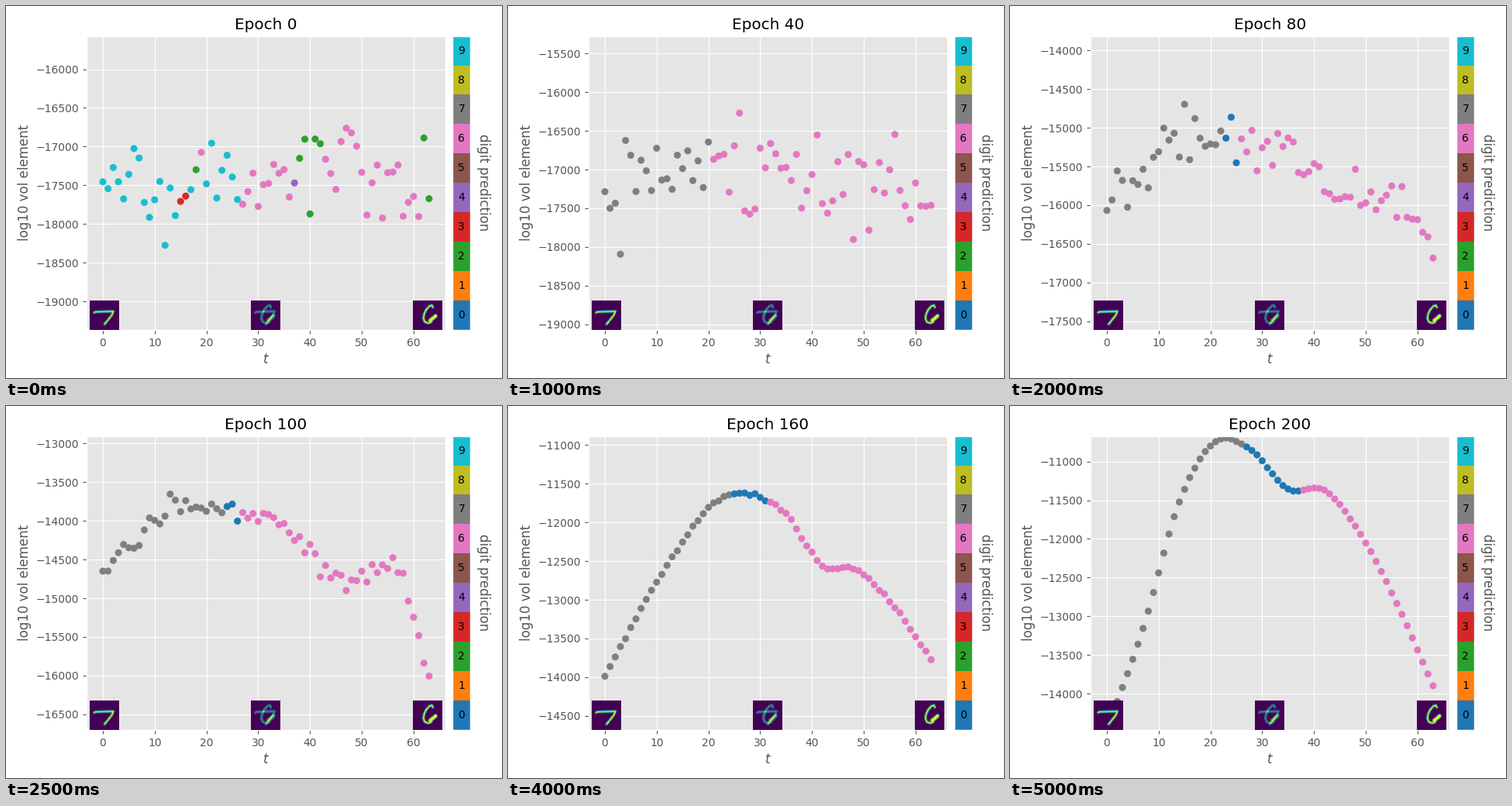
A matplotlib script for the animation above (5.5 s loop, 640 by 480 pixels).

```python
import matplotlib.pyplot as plt
import numpy as np
from matplotlib.animation import FuncAnimation
from matplotlib.ticker import MultipleLocator

W, H = 640, 480
STEPS = 64
SPAN = 3800
GREY = "#555555"
TOP, BOTTOM = 38.6, 418

plt.rcParams.update({
    "font.family": "DejaVu Sans", "font.size": 10,
    "axes.facecolor": "#E5E5E5", "axes.edgecolor": "white",
    "axes.linewidth": 1, "axes.grid": True, "axes.axisbelow": True,
    "axes.titlesize": 14.4, "axes.labelsize": 12, "axes.labelcolor": GREY,
    "grid.color": "white", "grid.linestyle": "-", "grid.linewidth": 0.8,
    "xtick.color": GREY, "ytick.color": GREY, "patch.linewidth": 0.5,
})

# Upper axis limit for every 20 epochs
LIMITS = [-15570, -15800, -15273, -14695, -13813, -12902,
          -11838, -11333, -10882, -10763, -10669]

# Evenly spaced key points of the trend, in tens below zero
TRENDS = {
    0: [1750, 1742, 1750],
    20: [1735, 1750, 1740],
    60: [1730, 1640, 1650, 1700, 1740],
    100: [1458, 1425, 1375, 1383, 1388, 1400, 1455, 1475, 1460, 1600],
    120: [1429, 1394, 1302, 1288, 1313, 1353, 1354, 1372, 1447, 1458],
    160: [1397, 1312, 1236, 1175, 1163, 1190, 1255, 1262, 1311, 1377],
    200: [1446, 1316, 1152, 1074, 1086, 1136, 1137, 1194, 1283, 1390],
}

# First step of each run of equal predictions, and its digit
FIRST_RUNS = [(0, 9), (15, 3), (17, 9), (18, 2), (19, 6), (20, 9), (27, 6),
              (37, 4), (38, 2), (43, 6), (62, 2)]
ZERO_FROM = [0, 19, 21, 22, 23, 24, 24, 24, 25, 26, 27]
SIX_FROM = [0, 19, 21, 25, 26, 27, 31, 32, 32, 35, 38]

ts = np.arange(STEPS)


def smooth(knots):
    """Cubic Hermite curve through evenly spaced knots."""
    k = np.array(knots, float)
    m = np.gradient(k)
    u = np.linspace(0, len(k) - 1, STEPS)
    i = np.minimum(u.astype(int), len(k) - 2)
    s = u - i
    ease = s * s * (3 - 2 * s)
    return (k[i] + ease * (k[i + 1] - k[i])
            + s * (1 - s) ** 2 * m[i] - s * s * (1 - s) * m[i + 1])


def trend(i):
    """Height below the upper limit; missing stages lie midway."""
    if 20 * i in TRENDS:
        return -10 * smooth(TRENDS[20 * i]) - LIMITS[i]
    return (trend(i - 1) + trend(i + 1)) / 2


def volumes(i):
    spread = 350 / (1 + (i / 4) ** 5)
    jitter = np.random.default_rng(i).standard_normal(STEPS)
    return LIMITS[i] + trend(i) + spread * jitter


def predictions(i):
    if i == 0:
        starts, digits = zip(*FIRST_RUNS)
        return np.array(digits)[np.searchsorted(starts, ts, "right") - 1]
    return np.where(ts < ZERO_FROM[i], 7, np.where(ts < SIX_FROM[i], 0, 6))


def px_axes(x0, y0, x1, y1):
    return fig.add_axes([x0 / W, 1 - y1 / H, (x1 - x0) / W, (y1 - y0) / H])


def stroke(points, width):
    """Soft polyline on a 28 x 28 grid, 0 to 1."""
    yy, xx = np.mgrid[:28, :28]
    dist = np.full((28, 28), 99.0)
    for (x0, y0), (x1, y1) in zip(points, points[1:]):
        dx, dy = x1 - x0, y1 - y0
        s = ((xx - x0) * dx + (yy - y0) * dy) / (dx * dx + dy * dy)
        s = np.clip(s, 0, 1)
        dist = np.minimum(dist, np.hypot(xx - x0 - s * dx, yy - y0 - s * dy))
    return np.clip(width + 0.5 - dist, 0, 1)


def draw_digit(img, x):
    inset = px_axes(x, 380, x + 38, 418)
    inset.imshow(img, cmap="viridis", vmin=0, vmax=1, aspect="auto")
    inset.axis("off")


fig = plt.figure(figsize=(W / 100, H / 100), dpi=100, facecolor="white")
ax = px_axes(103.95, TOP, 566.95, BOTTOM)
ax.set_xlim(-3.15, 66.15)
ax.set_xlabel("$t$")
ax.set_ylabel("log10 vol element")
ax.yaxis.set_major_locator(MultipleLocator(500))
title = ax.set_title("")
dots = ax.scatter(ts, ts)

seven = stroke([(3.7, 11), (5, 10.3), (22, 9.8), (20.5, 13.5), (13.7, 22)],
               0.9)
six = np.maximum(
    stroke([(18.5, 6), (17.5, 4), (15, 5), (12, 8.5), (10.2, 12.5),
            (9.5, 16.5), (10.8, 19.8), (14, 21), (17, 20)], 0.9),
    stroke([(16, 18.5), (18.5, 16.5), (21, 14.2)], 1.7))
draw_digit(seven, 108)
draw_digit((seven + six) / 2, 316)
draw_digit(six, 525)

bar = px_axes(576.3, TOP, 599.3, BOTTOM)
bar.set(xlim=(0, 1), ylim=(0, 10), xticks=[], yticks=[])
for d in range(10):
    bar.bar(0.5, 1, 1, bottom=d, color=f"C{d}", linewidth=0)
    bar.text(0.5, d + 0.5, str(d), ha="center", va="center")
fig.text(616 / W, 1 - 228 / H, "digit prediction", rotation=270,
         ha="center", va="center", size=12, color=GREY)


def update(i):
    dots.set_offsets(np.column_stack([ts, volumes(i)]))
    dots.set_color([f"C{d}" for d in predictions(i)])
    ax.set_ylim(LIMITS[i] - SPAN, LIMITS[i])
    title.set_text(f"Epoch {20 * i}")
    return dots, title


anim = FuncAnimation(fig, update, frames=len(LIMITS), interval=500,
                     repeat=True, repeat_delay=0, blit=False)
plt.show()
```
